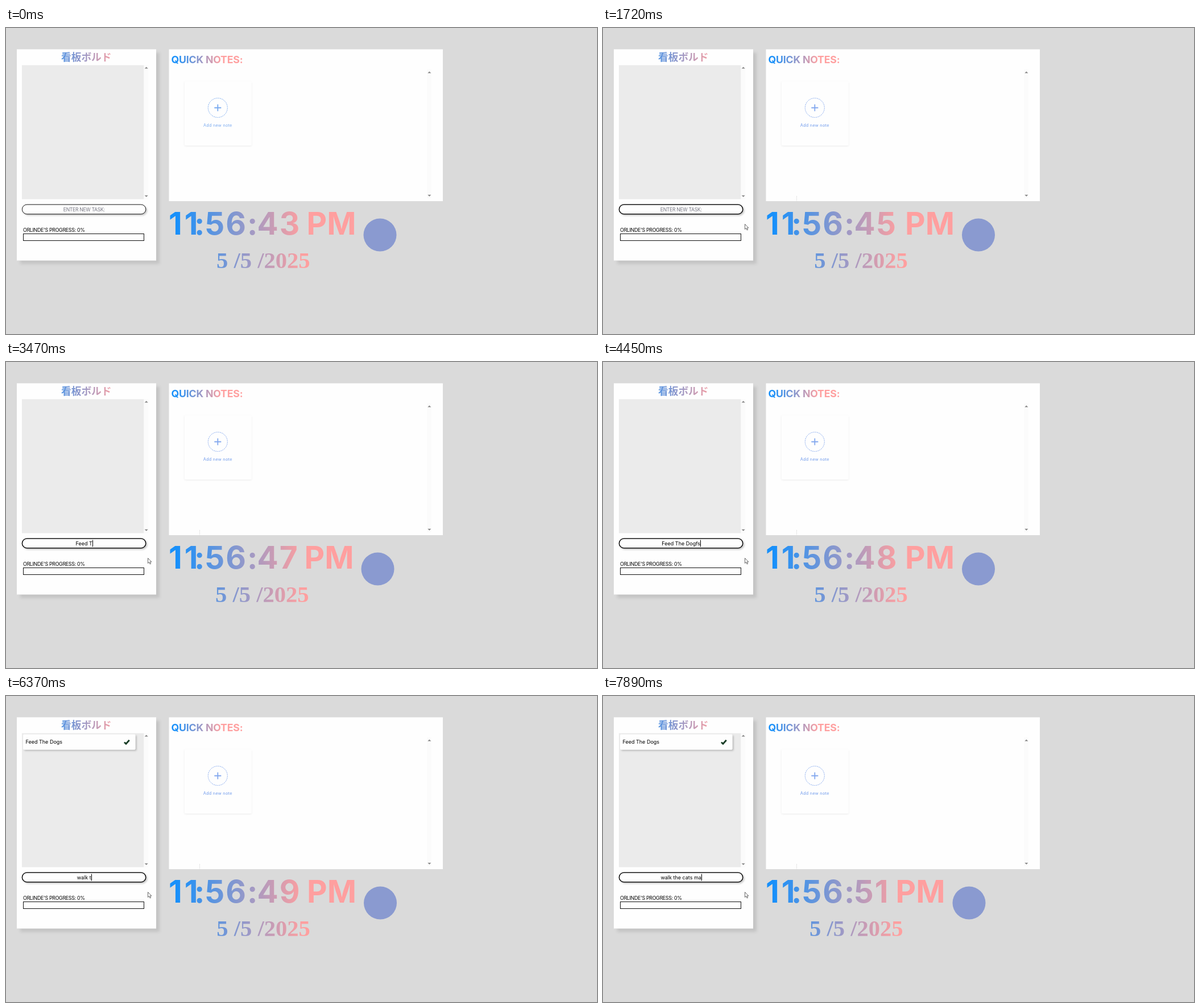
Write an HTML page that moves like this. It is 1039x539 px and loops after 8 s.

```html
<!DOCTYPE html>
<html lang="en">
<head>
<meta charset="utf-8">
<title>Task board</title>
<style>
  html, body { margin: 0; width: 100%; height: 100%; overflow: hidden; background: #dadada; }
  svg { display: block; width: 1039px; height: 539px; }
  text { font-family: Inter, "Open Sans", sans-serif; white-space: pre; }
  .heading { font-weight: 700; font-size: 17.7px; letter-spacing: -.2px; }
  .kanji { font: 700 17.7px "Noto Sans CJK JP", "Noto Sans CJK", sans-serif; }
  .clock { font-weight: 700; font-size: 55px; letter-spacing: 2px; }
  .clock #half { letter-spacing: 0; }
  .clock #hour { letter-spacing: 4px; }
  .date { font: 700 40.6px "Liberation Serif", Times, serif; }
  .body { font-size: 9px; }
  .caps { font-size: 8.8px; letter-spacing: -.28px; }
  .hint { font-size: 8.6px; letter-spacing: -.3px; fill: #757580; }
  .add { font-size: 7.2px; letter-spacing: .3px; }
  .arrow { fill: #858585; }
</style>
</head>
<body>
<svg viewBox="0 0 1039 539">
  <defs>
    <linearGradient id="fade">
      <stop stop-color="#1890fa"/><stop offset="1" stop-color="#ff9f9f"/>
    </linearGradient>
    <linearGradient id="titleFade" href="#fade" gradientUnits="userSpaceOnUse" x1="61" x2="194"/>
    <linearGradient id="notesFade" href="#fade" gradientUnits="userSpaceOnUse" x1="298" x2="378"/>
    <linearGradient id="clockFade" href="#fade" gradientUnits="userSpaceOnUse" x1="300" x2="522"/>
    <filter id="panelShadow" x="-10%" y="-10%" width="125%" height="125%">
      <feDropShadow dx="6" dy="6" stdDeviation="2.8" flood-opacity=".1"/>
    </filter>
    <filter id="softShadow" x="-10%" y="-30%" width="120%" height="190%">
      <feDropShadow dx="2" dy="2" stdDeviation="1.5" flood-opacity=".22"/>
    </filter>
    <filter id="faintShadow" x="-10%" y="-10%" width="120%" height="120%">
      <feDropShadow dx="0" dy="1" stdDeviation="1.5" flood-opacity=".08"/>
    </filter>
    <clipPath id="dateBox"><rect x="287" y="385" width="480" height="37.7"/></clipPath>
    <path id="up" d="M-3 1.5L0-1.5L3 1.5Z"/>
  </defs>
  <rect width="1039" height="539" fill="#dadada"/>

  <rect x="19" y="37.5" width="245" height="372" fill="#fefefe" filter="url(#panelShadow)"/>
  <text class="kanji" x="97" y="58.2" fill="url(#titleFade)">看板ボルド</text>
  <rect x="28" y="65.5" width="214.5" height="236" fill="#ebebeb"/>
  <rect x="242.5" y="65.5" width="8" height="236" fill="#fbfbfb"/>
  <use class="arrow" href="#up" x="246.7" y="70"/>
  <use class="arrow" href="#up" transform="translate(246.7 296.3) scale(1 -1)"/>

  <g id="task">
    <rect x="30" y="67.5" width="197.5" height="27" rx="2" fill="#fefefe" filter="url(#softShadow)"/>
    <text class="body" x="34.5" y="84.2">Feed The Dogs</text>
    <path d="M208 81.5L211 84.2L216.8 77.8" fill="none" stroke="#173c25" stroke-width="2.8"/>
  </g>

  <rect id="field" x="28.4" y="311" width="217.4" height="16.8" rx="8.4" fill="#fefefe" stroke="#111" filter="url(#softShadow)"/>
  <text id="hint" class="hint" x="137.2" y="322.8" text-anchor="middle">ENTER NEW TASK:</text>
  <text id="typed" class="body" x="137.2" y="322.8" text-anchor="middle"></text>
  <rect id="caret" y="313.5" width="1" height="12"/>

  <text class="caps" x="30" y="358.8">ORLINDE'S PROGRESS: 0%</text>
  <rect x="30.5" y="362.5" width="212" height="12" fill="#fefefe" stroke="#111"/>

  <rect x="286.5" y="37.5" width="481.5" height="267.5" fill="#fefefe"/>
  <text class="heading" x="290.5" y="61.6" fill="url(#notesFade)">QUICK NOTES:</text>
  <rect x="740" y="73" width="8" height="227" fill="#fbfbfb"/>
  <use class="arrow" href="#up" x="744.3" y="78"/>
  <use class="arrow" href="#up" transform="translate(744.3 295.3) scale(1 -1)"/>
  <rect x="314" y="94" width="117.5" height="113" rx="2" fill="#fefefe" filter="url(#faintShadow)"/>
  <g id="addNote">
    <circle cx="372.3" cy="140.5" r="17" fill="none" stroke="currentColor" stroke-dasharray="2 1.2"/>
    <path d="M366.3 140.5H378.3M372.3 134.5V146.5" stroke="currentColor" stroke-width="1.8"/>
    <text class="add" x="372.3" y="174" text-anchor="middle" fill="currentColor">Add new note</text>
  </g>
  <path id="trail" d="M340.5 296V304.5" stroke="#d2d2d2" stroke-dasharray="1 1"/>

  <g class="clock" fill="url(#clockFade)">
    <text id="hour" x="286" y="364">11</text>
    <text x="331" y="364">:</text>
    <text x="350" y="364">56</text>
    <text x="424" y="364">:</text>
    <text id="seconds" x="441.5" y="364"></text>
    <text id="half" x="528.5" y="364">PM</text>
  </g>
  <g clip-path="url(#dateBox)">
    <text id="date" class="date" x="370" y="423.4" fill="url(#clockFade)">5 /5 /2025</text>
  </g>
  <circle id="badge" cx="657.5" cy="364.5" r="29" fill="#8a9ad0"/>

  <path id="pointer" d="M0 0V9L2.1 7.1L3.7 10.5L5.1 9.9L3.6 6.6H6.4Z" fill="#fff" stroke="#444" stroke-width=".8"/>
</svg>
<script>
const LOOP = 8000, FOCUS = 1220, SUBMIT = 4960;
const $ = id => document.getElementById(id);
const show = (el, on) => el.setAttribute('visibility', on ? 'visible' : 'hidden');

// Bursts of typing: start, time per key, keys (< deletes one letter).
const bursts = [
  [2800, 80, 'Fe'], [3060, 80, 'ed '], [3390, 105, 'The '], [3880, 60, 'Dogfs'],
  [4620, 80, '<<s'], [5540, 140, 'walk'], [6210, 82, ' the ca'], [6870, 80, 'ts'], [7550, 170, ' ma']
];
const strokes = bursts.flatMap(([start, gap, keys]) =>
  [...keys].map((key, i) => ({ time: start + i * gap, key })));

function fieldAt(t) {
  const cleared = t >= SUBMIT ? SUBMIT : FOCUS;
  const done = strokes.filter(s => s.time >= cleared && s.time <= t);
  return {
    text: done.reduce((text, s) => s.key === '<' ? text.slice(0, -1) : text + s.key, ''),
    since: done.length ? done.at(-1).time : cleared
  };
}

// How far each last digit, by its width, pushes what follows it.
const digitPush = [2, -13, 0, 0, 3.5, 2.5, .5, -4, 2.5, .5];
const pushOf = s => digitPush[s % 10] - (s >= 50 ? 1 : 0);

const mix = (a, b, k) => a.map((v, i) => v + (b[i] - v) * k);
const phase = (t, from, to) => Math.min(1, Math.max(0, (t - from) / (to - from)));
const ease = k => k * k * (3 - 2 * k);

// A curved sweep to the field, then a straight move away.
function pointerAt(t) {
  const enter = [840, 502], bend = [330, 195], click = [152, 317], rest = [249.5, 345.5];
  if (t > FOCUS) return mix(click, rest, ease(phase(t, FOCUS, 1550)));
  const k = phase(t, 230, 1060);
  return mix(mix(enter, bend, k), mix(bend, click, k), k);
}

function draw(t) {
  const seconds = 43 + Math.floor((t + 550) / 1000), push = pushOf(seconds);
  $('seconds').textContent = seconds;
  for (const [id, k] of [['half', 1], ['badge', 1], ['date', .5]])
    $(id).setAttribute('transform', `translate(${push * k})`);

  const focused = t >= FOCUS;
  $('field').setAttribute('stroke-width', focused ? 1.5 : 1);
  $('addNote').setAttribute('color', focused ? '#83a8ee' : '#78a9ef');
  $('addNote').setAttribute('font-weight', focused ? 500 : 400);
  show($('task'), t >= SUBMIT);
  show($('trail'), t >= 650);

  const { text, since } = fieldAt(t), typed = $('typed');
  if (typed.textContent !== text) typed.textContent = text;
  show($('hint'), !text);
  show($('caret'), focused && (t - since) % 1000 < 500);
  $('caret').setAttribute('x', Math.round(137 + (text ? typed.getComputedTextLength() / 2 : 0)));

  show($('pointer'), t >= 230);
  $('pointer').setAttribute('transform', `translate(${pointerAt(t)})`);
}

const start = performance.now();
function loop() {
  draw((performance.now() - start) % LOOP);
  requestAnimationFrame(loop);
}
loop();
</script>
</body>
</html>
```
